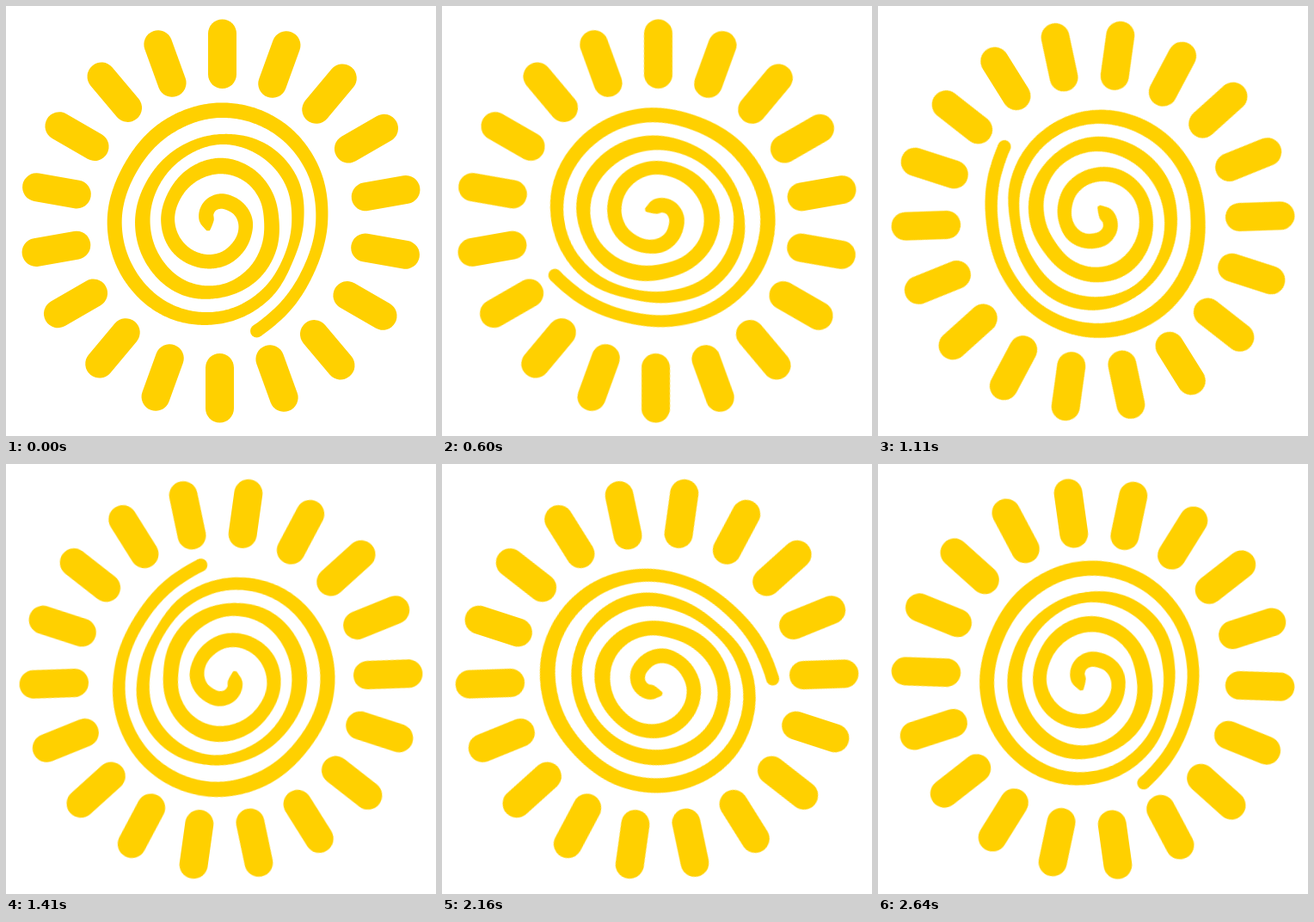
An HTML page that plays this animation: 500 px wide and 500 px high, repeating every 2670 ms.

```html
<!DOCTYPE html>
<html lang="en">
<head>
<meta charset="utf-8">
<title>Spinning sun</title>
<style>
  html, body { margin: 0; width: 100%; height: 100%; overflow: hidden; background: #fff; }
  svg { display: block; width: 100%; height: 100%; }
  #sun {
    fill: #ffd000;
    transform-origin: 250px 250px;
    animation: spin 2670ms steps(89) infinite;
  }
  @keyframes spin { to { transform: rotate(356deg); } }
</style>
</head>
<body>
<svg viewBox="0 0 500 500">
  <g id="sun">
    <g id="rays"></g>
    <path id="spiral"/>
    <circle id="cap" r="7.5"/>
  </g>
</svg>
<script>
  const NS = 'http://www.w3.org/2000/svg';
  const C = 250, RAYS = 18;
  const $ = id => document.getElementById(id);

  for (let i = 0; i < RAYS; i++) {
    const ray = document.createElementNS(NS, 'rect');
    const attrs = { x: 235, y: 15.5, width: 33, height: 80.5, rx: 16.5,
                    transform: `rotate(${i * 360 / RAYS} ${C} ${C})` };
    for (const k in attrs) ray.setAttribute(k, attrs[k]);
    $('rays').append(ray);
  }

  // Brush stroke: distance from the centre and thickness, every 30 degrees
  const FROM = 120, STEP = 30, START = 143, END = 1512;
  const radius = [
    24, 17.5, 16.5, 19.5, 22, 23, 23.2, 25.3, 28.2, 31.5, 37, 45,
    52.5, 58.8, 61.8, 61.8, 63, 64, 62.5, 60, 58.8, 64, 72.5, 81.5,
    89, 91, 91.2, 90.5, 92, 95, 96, 94, 89.2, 90, 100.5, 112,
    120.5, 123.5, 123.8, 122, 125.5, 128.8, 127.5, 122.5, 117.2, 117, 127.5, 144];
  const width = [
    -9, 7, 16.5, 17, 17, 17.5, 17.5, 17, 17, 16, 16.5, 16.5,
    16.5, 17, 16, 16, 17.5, 18.5, 17.5, 17, 17.5, 18, 17, 15,
    17, 18, 17.5, 15, 13.5, 12, 15.5, 16, 14, 12, 14, 14.5,
    16, 17, 17, 17, 18, 17.5, 17, 15.5, 14, 14, 15, 15];

  // Catmull-Rom interpolation
  function sample(list, deg) {
    const p = (deg - FROM) / STEP, i = Math.floor(p), t = p - i;
    const at = k => list[Math.max(0, Math.min(list.length - 1, k))];
    const a = at(i - 1), b = at(i), c = at(i + 1), d = at(i + 2);
    return b + t / 2 * (c - a + t * (2 * a - 5 * b + 4 * c - d + t * (3 * (b - c) + d - a)));
  }

  function point(deg) {
    const r = sample(radius, deg), a = deg * Math.PI / 180;
    return [C + r * Math.cos(a), C + r * Math.sin(a)];
  }

  const outer = [], inner = [];
  for (let deg = START; deg <= END; deg += 1) {
    const [x, y] = point(deg), [x0, y0] = point(deg - 0.5), [x1, y1] = point(deg + 0.5);
    const half = Math.max(0, sample(width, deg)) / 2 / Math.hypot(x1 - x0, y1 - y0);
    const nx = (y1 - y0) * half, ny = (x0 - x1) * half;
    outer.push([x + nx, y + ny]);
    inner.unshift([x - nx, y - ny]);
  }
  const fmt = p => p.map(v => v.toFixed(2)).join(' ');
  $('spiral').setAttribute('d', 'M' + outer.concat(inner).map(fmt).join('L') + 'Z');

  const [cx, cy] = point(END);
  $('cap').setAttribute('cx', cx);
  $('cap').setAttribute('cy', cy);
</script>
</body>
</html>
```
